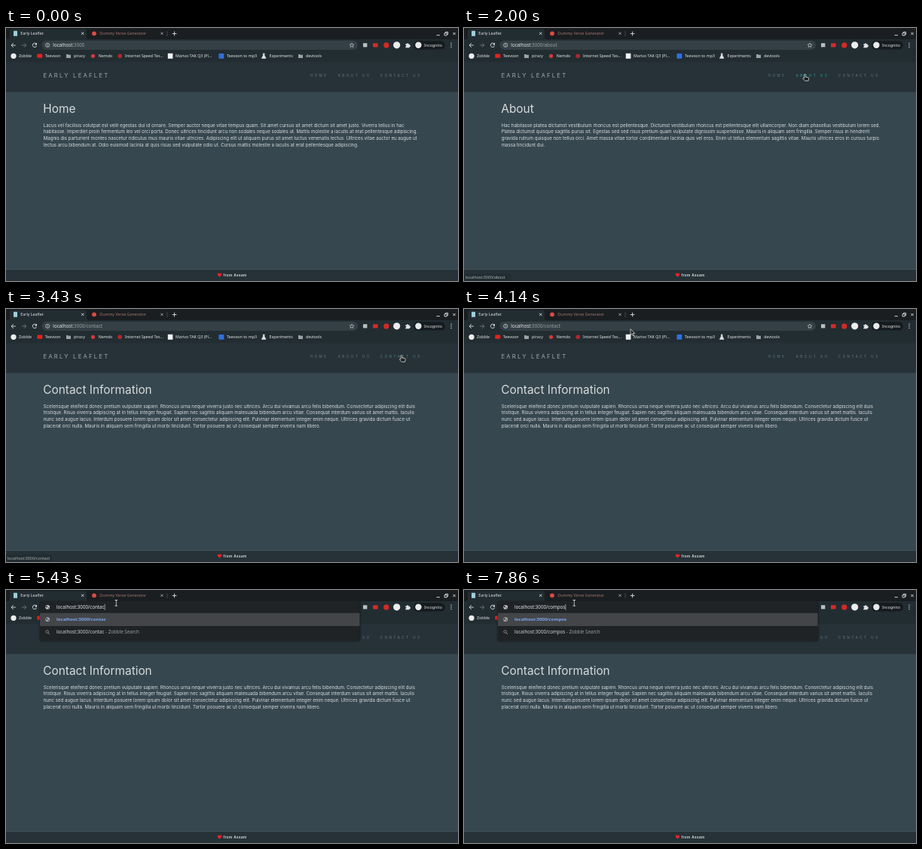
Recreate the animation shown at these times as an HTML page. Size 600 px wide and 337 px high, loop 8000 ms.

```html
<!DOCTYPE html>
<html lang="en">
<head>
<meta charset="utf-8">
<title>Early Leaflet</title>
<style>
html, body { margin: 0; width: 100%; height: 100%; overflow: hidden; background: #37474f; }
svg { display: block; width: 100vw; height: 100vh; }
text { font-family: "Noto Sans", "Open Sans", sans-serif; font-size: 5.3px; fill: #e3e6e8; white-space: pre; }
.url text, text.url { font-size: 6.2px; }
.page text { font-family: Inter, Roboto, sans-serif; }
.body text { font-size: 6.12px; fill: #d6dcdf; }
.page .title { font-size: 15.4px; fill: #d6dbdd; }
.page .brand { font-size: 7.8px; letter-spacing: 2.15px; fill: #98a8b0; }
.page .nav { font-size: 4.5px; letter-spacing: 2.55px; fill: #667a83; }
.page .foot { font-size: 4.6px; font-weight: 600; letter-spacing: .45px; fill: #e4e8ea; }
.line { fill: none; stroke: #dfe3e5; stroke-width: .9; }
.dim { fill: #98a0a4; }
</style>
</head>
<body>
<svg viewBox="0 0 600 337" preserveAspectRatio="none">
  <defs>
    <filter id="soft" x="-5%" y="-20%" width="110%" height="150%"><feGaussianBlur stdDeviation="1.6"/></filter>
    <g id="globe">
      <circle r="2.9" fill="#c5c9cc"/>
      <path d="M-2 -1.6L.2 -1.2L-.4 .4L-2.4 .2ZM.6 .5L2.3 .2L1.4 2L.3 1.6Z" fill="#2c3236"/>
    </g>
    <path id="folder" d="M-3 -2.4h2.2l.8 .8h3v4.2h-6z" fill="#9aa3a8"/>
    <path id="cross" class="line" d="M-1.6 -1.6L1.6 1.6M1.6 -1.6L-1.6 1.6"/>
  </defs>

  <g class="page">
    <rect width="600" height="337" fill="#37474f"/>
    <rect y="45" width="600" height="40.3" fill="#263238"/>
    <text class="brand" x="49.5" y="66">EARLY LEAFLET</text>
    <text class="nav" x="403.7" y="65">HOME</text>
    <text class="nav" id="about" x="440.7" y="65">ABOUT US</text>
    <text class="nav" id="contact" x="496.8" y="65">CONTACT US</text>
    <text class="title" id="title" x="49.3" y="113"/>
    <g class="body" id="body"></g>
    <rect y="321.3" width="600" height="16" fill="#263238"/>
    <rect y="321" width="600" height=".7" fill="#4b5d66"/>
    <path d="M283.5 331.7L280.9 329C279.8 327.2 282.4 325.6 283.5 327.4C284.6 325.6 287.2 327.2 286.1 329Z" fill="#e0262d"/>
    <text class="foot" x="288.4" y="331">from Assam</text>
  </g>

  <g id="status">
    <path d="M0 327H59.5Q61.5 327 61.5 329V337H0Z" fill="#222d32"/>
    <text id="link" x="2" y="334" style="fill:#adb4b8"/>
  </g>

  <rect width="600" height="45.3" fill="#222d32"/>
  <rect width="600" height="15" fill="#1a1e21"/>
  <path d="M2 15Q5 15 5 12V4Q5 1.5 8 1.5H104Q107 1.5 107 4V12Q107 15 110 15Z" fill="#222d32"/>
  <rect x="10" y="3.8" width="5" height="7" rx=".6" fill="#9dd0da"/>
  <text x="19.3" y="9.3">Early Leaflet</text>
  <use href="#cross" x="101.7" y="7.3"/>
  <circle cx="117" cy="7.3" r="2.9" fill="#dc4a43"/>
  <text x="124.3" y="9.3" style="fill:#a4766f">Dummy Verse Generator</text>
  <use href="#cross" x="207" y="7.3" opacity=".7"/>
  <path d="M214 4V11" stroke="#5a6063" stroke-width=".6"/>
  <path class="line" d="M220.8 7.5h5.6M223.6 4.7v5.6"/>
  <path class="line" d="M571.5 9.6h4.4M582 6.7h3.2v3.2h-3.2zM583.4 6.5v-1.2h3.2v3.2h-1.2"/>
  <use href="#cross" x="595" y="7.5"/>

  <path class="line" d="M12.8 23H7.2M9.8 20.2L7 23L9.8 25.8"/>
  <path class="line" d="M21 23h5.6M24 20.2L26.8 23L24 25.8" opacity=".4"/>
  <path class="line" d="M40.2 21.2A2.7 2.7 0 1 0 40.6 23.7"/>
  <path d="M41 19.6v3h-3z" fill="#dfe3e5"/>

  <rect id="field" x="47.5" y="16.7" width="419.5" height="12.2" rx="6.1" fill="#344046" stroke="#46a9bd"/>
  <g id="idle" class="url">
    <circle class="line" cx="55.2" cy="22.8" r="2.6" style="stroke-width:.7"/>
    <path d="M55.2 22.4v1.9M55.2 21v.8" stroke="#dfe3e5" stroke-width=".7"/>
    <rect id="pick" x="62" y="18.7" height="8.2" fill="#00bcd4"/>
    <text id="url" x="62.3" y="25">localhost<tspan id="path" class="dim"/></text>
  </g>
  <path class="line" d="M459 20l.9 1.9 2 .2-1.5 1.4.5 2-1.9-1.1-1.9 1.1.5-2-1.5-1.4 2-.2z" style="stroke-width:.6"/>
  <rect x="474" y="20.2" width="5.4" height="5.2" fill="#b9bec1"/>
  <rect x="487" y="20.2" width="6.6" height="5.2" rx="1" fill="#d32b2b"/>
  <circle cx="504.8" cy="22.9" r="3.6" fill="#d42a25"/>
  <circle cx="518.7" cy="22.8" r="4.6" fill="#eceeee"/>
  <path d="M530.3 21.3h1.6a1.1 1.1 0 1 1 2.2 0h1.5v1.5a1.1 1.1 0 1 1 0 2.1v1.3h-5.3v-1.5a1 1 0 1 0 0-2z" fill="#dfe3e5"/>
  <rect x="541" y="17" width="42" height="11.6" rx="5.8" fill="#151b1e"/>
  <circle cx="547.4" cy="22.8" r="4.2" fill="#e8eaeb"/>
  <text x="555" y="24.7">Incognito</text>
  <path d="M591 20.2v.01M591 22.8v.01M591 25.4v.01" stroke="#dfe3e5" stroke-width="1.4" stroke-linecap="round"/>

  <g id="marks">
    <circle cx="10" cy="37.3" r="3.6" fill="#eceeee"/>
    <rect x="41.3" y="34.6" width="7" height="5.2" rx="1.4" fill="#e8201c"/>
    <use href="#folder" x="83" y="37.3"/>
    <circle cx="115.5" cy="37.3" r="2.6" fill="#d9363a"/>
    <circle cx="151.2" cy="37.3" r="2.8" fill="#b3262b"/>
    <rect x="214.8" y="33.8" width="6.6" height="7" fill="#f2f3f3"/>
    <rect x="282.5" y="34" width="6.8" height="6.8" rx=".8" fill="#2f6fe0"/>
    <path d="M340.8 34.2h2.8M341.4 34.2v2l-2 4.2h5.6l-2-4.2v-2z" fill="#dfe3e5" stroke="#dfe3e5" stroke-width=".6"/>
    <use href="#folder" x="391" y="37.3"/>
  </g>

  <g id="drop" class="url">
    <rect x="45" y="16" width="425" height="52" rx="3" fill="#000" opacity=".55" filter="url(#soft)"/>
    <rect x="45" y="14.5" width="424.5" height="53.5" rx="3" fill="#202326"/>
    <rect x="45" y="30.7" width="424.5" height="17.3" fill="#434548"/>
    <use href="#globe" x="55.2" y="22.8"/>
    <use href="#globe" x="55.2" y="39.2" opacity=".75"/>
    <circle class="line" cx="54.6" cy="55.5" r="1.8" style="stroke:#a4a8ab;stroke-width:.7"/>
    <path d="M56 57l2 2" stroke="#a4a8ab" stroke-width=".8"/>
    <text id="typed" x="67" y="25"/>
    <rect id="caret" y="18.8" width=".6" height="8" fill="#e8eaed"/>
    <text id="hint" x="67" y="41.3" style="font-size:6.05px;font-weight:600;fill:#7ba7f2"/>
    <text x="67" y="58.3" style="fill:#cfd2d4"><tspan id="query"/><tspan class="dim"> - Zobble Search</tspan></text>
  </g>

  <g id="cursor" stroke="#f4f4f4" stroke-width=".7" stroke-linejoin="round" fill="#1d2224">
    <path id="arrow" d="M0 0V8L1.9 6.3L3.2 9L4.5 8.4L3.2 5.8H5.8Z"/>
    <path id="hand" d="M-1 .6Q-1 -.3 -.2 -.3T.8 .6V3.4L4.6 4.2Q5.4 4.5 5.2 5.5L4.5 8.6H.1L-2.6 5.6Q-2.6 4.4 -1 5.2Z"/>
    <g id="beam" fill="none" stroke-linejoin="miter">
      <path d="M-1.8 -3.8H1.8M0 -3.8V3.8M-1.8 3.8H1.8" stroke="#111" stroke-width="1.7"/>
      <path d="M-1.8 -3.8H1.8M0 -3.8V3.8M-1.8 3.8H1.8" stroke-width=".8"/>
    </g>
  </g>
</svg>
<script>
const LOOP = 8000, STEP = 1000 / 7;
const $ = id => document.getElementById(id);
const show = (id, on) => $(id).setAttribute("display", on ? "inline" : "none");
const clamp = v => Math.max(0, Math.min(1, v));

const pages = {
  home: ["Home", "",
    "Lacus vel facilisis volutpat est velit egestas dui id ornare. Semper auctor neque vitae tempus quam. Sit amet cursus sit amet dictum sit amet justo. Viverra tellus in hac",
    "habitasse. Imperdiet proin fermentum leo vel orci porta. Donec ultrices tincidunt arcu non sodales neque sodales ut. Mattis molestie a iaculis at erat pellentesque adipiscing.",
    "Magnis dis parturient montes nascetur ridiculus mus mauris vitae ultricies. Adipiscing elit ut aliquam purus sit amet luctus venenatis lectus. Ultrices vitae auctor eu augue ut",
    "lectus arcu bibendum at. Odio euismod lacinia at quis risus sed vulputate odio ut. Cursus mattis molestie a iaculis at erat pellentesque adipiscing."],
  about: ["About", "/about",
    "Hac habitasse platea dictumst vestibulum rhoncus est pellentesque. Dictumst vestibulum rhoncus est pellentesque elit ullamcorper. Non diam phasellus vestibulum lorem sed.",
    "Platea dictumst quisque sagittis purus sit. Egestas sed sed risus pretium quam vulputate dignissim suspendisse. Mauris in aliquam sem fringilla. Semper risus in hendrerit",
    "gravida rutrum quisque non tellus orci. Amet massa vitae tortor condimentum lacinia quis vel eros. Enim ut tellus elementum sagittis vitae. Mauris ultrices eros in cursus turpis",
    "massa tincidunt dui."],
  contact: ["Contact Information", "/contact",
    "Scelerisque eleifend donec pretium vulputate sapien. Rhoncus urna neque viverra justo nec ultrices. Arcu dui vivamus arcu felis bibendum. Consectetur adipiscing elit duis",
    "tristique. Risus viverra adipiscing at in tellus integer feugiat. Sapien nec sagittis aliquam malesuada bibendum arcu vitae. Consequat interdum varius sit amet mattis. Iaculis",
    "nunc sed augue lacus. Interdum posuere lorem ipsum dolor sit amet consectetur adipiscing elit. Pulvinar elementum integer enim neque. Ultrices gravida dictum fusce ut",
    "placerat orci nulla. Mauris in aliquam sem fringilla ut morbi tincidunt. Tortor posuere ac ut consequat semper viverra nam libero."]
};

// time, x, y of the pointer tip
const track = [[430, 159, 104], [860, 290, 88], [1290, 440, 66], [1430, 452.5, 61.8], [2150, 452.5, 61.8],
  [2570, 522, 72.8], [2860, 522, 72.8], [3150, 525, 61.8], [3570, 525, 61.8], [3710, 452, 55],
  [4000, 290, 34], [4290, 150, 19], [4430, 146.3, 17.3]];
// time, text typed after the port
const typing = [[5290, "/contact"], [5430, "/contac"], [5570, "/conta"], [5710, "/cont"], [5860, "/con"],
  [6140, "/co"], [6860, "/com"], [7140, "/comp"], [7430, "/compo"], [7710, "/compos"]];

const svgText = (parent, x, y, s) => {
  const el = document.createElementNS("http://www.w3.org/2000/svg", "text");
  el.setAttribute("x", x);
  el.setAttribute("y", y);
  el.textContent = s;
  parent.appendChild(el);
  return el;
};

[[17, "Zobble"], [51.7, "Teevoon"], [90, "piracy"], [122.7, "Nemdo"], [158, "Internet Speed Tes..."],
  [225, "Marivo TAK Q3 (Pl..."], [293, "Teevoon to mp3"], [349.5, "Experiments"], [398, "devtools"]]
  .forEach(([x, s]) => svgText($("marks"), x, 39.2, s));
const rows = [0, 1, 2, 3].map(i => svgText($("body"), 49.7, 131.6 + i * 8.78, ""));

let current;
function setPage(name) {
  if (name === current) return;
  current = name;
  const [title, path, ...lines] = pages[name];
  $("title").textContent = title;
  $("path").textContent = ":3000" + path;
  rows.forEach((row, i) => row.textContent = lines[i]);
}

function pointAt(t) {
  const i = track.findIndex(p => p[0] > t);
  if (i < 0) return track[track.length - 1].slice(1);
  if (i === 0) return track[0].slice(1);
  const a = track[i - 1], b = track[i], k = (t - a[0]) / (b[0] - a[0]);
  return [1, 2].map(n => a[n] + (b[n] - a[n]) * k);
}

const ramp = (t, from, to) => clamp((t - from) / 200) * clamp(1 - (t - to) / 120);
function tint(id, k) {
  const mix = [[102, 122, 131], [28, 176, 176]];
  $(id).style.fill = `rgb(${mix[0].map((c, i) => Math.round(c + (mix[1][i] - c) * k))})`;
}

function draw(t) {
  setPage(t < 1850 ? "home" : t < 3420 ? "about" : "contact");

  tint("about", t < 1850 ? ramp(t, 1230, 9999) : ramp(t, 1850, 2200));
  tint("contact", t < 3420 ? ramp(t, 2640, 9999) : ramp(t, 3400, 3580));

  const onAbout = t >= 1570 && t < 2420, onContact = t >= 2850 && t < 4000;
  show("status", onAbout || onContact);
  $("link").textContent = "localhost:3000" + (onAbout ? "/about" : "/contact");

  const picked = t >= 4420 && t < 5280, editing = t >= 5280;
  show("pick", picked);
  show("idle", !editing);
  show("drop", editing);
  $("field").setAttribute("stroke-opacity", picked ? 1 : 0);
  $("path").style.fill = picked ? "#fff" : "";
  if (picked) $("pick").setAttribute("width", $("url").getComputedTextLength() + .6);

  if (editing) {
    const [since, tail] = typing.filter(k => k[0] <= t + 10).pop();
    for (const id of ["typed", "hint", "query"]) $(id).textContent = "localhost:3000" + tail;
    $("caret").setAttribute("x", 67.3 + $("typed").getComputedTextLength());
    show("caret", (t - since + 10) % 1000 < 500);
  }

  const [x, y] = pointAt(t);
  const hand = t >= 1280 && t < 2270 || t >= 2420 && t < 3600;
  const beam = t >= 4280;
  show("cursor", t >= 425);
  show("hand", hand);
  show("beam", beam);
  show("arrow", !hand && !beam);
  $("cursor").setAttribute("transform", `translate(${x} ${y})`);
}

function tick(now) {
  const t = now % LOOP;
  draw(Math.floor((t + 5) / STEP) * STEP);
  requestAnimationFrame(tick);
}
draw(0);
requestAnimationFrame(tick);
</script>
</body>
</html>
```
